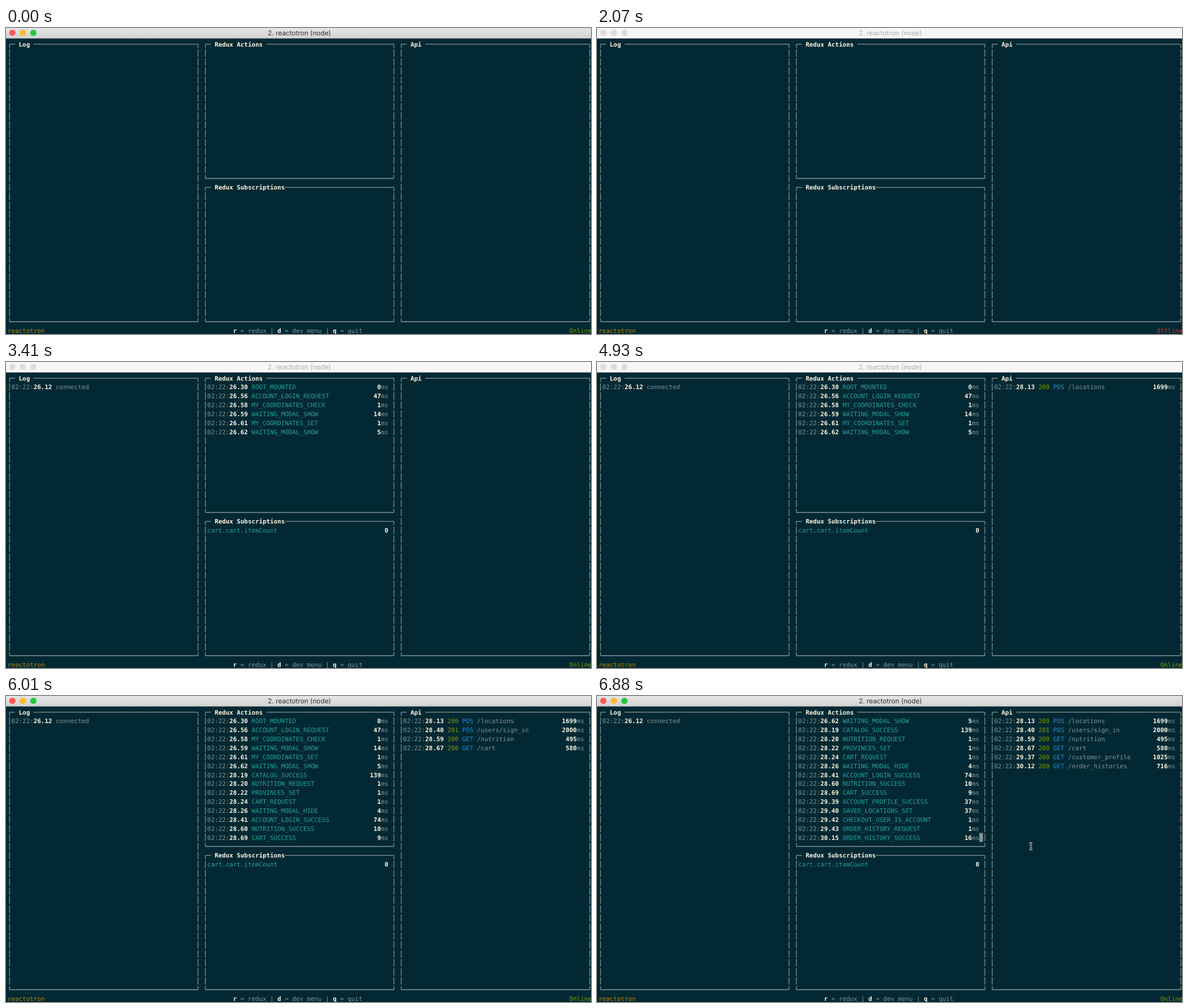
Animation, 1033 px wide and 542 px high, one loop 8 s. Source, as an HTML page with a canvas:

```html
<!DOCTYPE html>
<html lang="en">
<head>
<meta charset="utf-8">
<title>2. reactotron (node)</title>
<style>
html, body { margin: 0; width: 100%; height: 100%; overflow: hidden; background: #022933; }
canvas { display: block; }
</style>
</head>
<body>
<canvas id="stage" width="1033" height="542"></canvas>
<script>
const ctx = document.getElementById('stage').getContext('2d');
const LOOP = 8000, CELL = 6.525, ROW = 15.86, VISIBLE = 14;
const C = {
  bg: '#022933', gray: '#839496', white: '#fdf6e3', cyan: '#2aa198',
  blue: '#268bd2', green: '#859900', yellow: '#b58900', red: '#dc322f'
};

// appears at (ms), clock, name, duration
const actions = [
  [3320, '26.30', 'ROOT_MOUNTED', 0],
  [3320, '26.56', 'ACCOUNT_LOGIN_REQUEST', 47],
  [3410, '26.58', 'MY_COORDINATES_CHECK', 1],
  [3410, '26.59', 'WAITING_MODAL_SHOW', 14],
  [3410, '26.61', 'MY_COORDINATES_SET', 1],
  [3410, '26.62', 'WAITING_MODAL_SHOW', 5],
  [5020, '28.19', 'CATALOG_SUCCESS', 139],
  [5020, '28.20', 'NUTRITION_REQUEST', 1],
  [5020, '28.22', 'PROVINCES_SET', 1],
  [5020, '28.24', 'CART_REQUEST', 1],
  [5020, '28.26', 'WAITING_MODAL_HIDE', 4],
  [5200, '28.41', 'ACCOUNT_LOGIN_SUCCESS', 74],
  [5380, '28.60', 'NUTRITION_SUCCESS', 10],
  [5470, '28.69', 'CART_SUCCESS', 9],
  [6180, '29.39', 'ACCOUNT_PROFILE_SUCCESS', 37],
  [6270, '29.40', 'SAVED_LOCATIONS_SET', 37],
  [6270, '29.42', 'CHECKOUT_USER_IS_ACCOUNT', 1],
  [6270, '29.43', 'ORDER_HISTORY_REQUEST', 1],
  [6880, '30.15', 'ORDER_HISTORY_SUCCESS', 16]
];
// appears at (ms), clock, status, verb, path, duration
const calls = [
  [4930, '28.13', 200, 'POS', '/locations', 1699],
  [5200, '28.40', 201, 'POS', '/users/sign_in', 2000],
  [5380, '28.59', 200, 'GET', '/nutrition', 495],
  [5470, '28.67', 200, 'GET', '/cart', 580],
  [6180, '29.37', 200, 'GET', '/customer_profile', 1025],
  [6880, '30.12', 200, 'GET', '/order_histories', 716]
];
// time, x, y of the mouse pointer
const pointer = [[6450, 1023, 306], [6540, 905, 272], [6630, 795, 259], [6700, 766, 266]];

const colX = col => 3 + col * CELL;
const rowY = row => 28.6 + row * ROW;
const midX = col => colX(col + 0.5);

// Terminal text: one glyph per grid cell; returns the next free column.
function put(col, row, text, color = C.gray, bold = false) {
  ctx.font = `${bold ? 'bold ' : ''}10.84px "DejaVu Sans Mono", Menlo, monospace`;
  ctx.textAlign = 'left';
  ctx.fillStyle = color;
  for (const ch of String(text)) ctx.fillText(ch, colX(col++), rowY(row) + 4);
  return col;
}

const strong = (col, row, text) => put(col, row, text, C.white, true);
const stamp = (col, row, clock) => strong(put(col, row, '02:22:'), row, clock);

function duration(end, row, ms) {
  put(strong(end - 2 - String(ms).length, row, ms), row, 'ms');
}

function line(x1, y1, x2, y2) {
  ctx.beginPath();
  ctx.moveTo(x1, y1);
  ctx.lineTo(x2, y2);
  ctx.stroke();
}

function panel(left, right, top, bottom, title, gap = 1) {
  const x1 = midX(left), x2 = midX(right), y1 = rowY(top), y2 = rowY(bottom), half = 6.6;
  ctx.strokeStyle = C.gray;
  ctx.lineWidth = 1.3;
  line(x1, y1, colX(left + 2), y1);
  line(colX(left + 3 + title.length + gap), y1, x2, y1);
  line(x1, y2, x2, y2);
  for (const x of [x1, x2]) {
    line(x, y1, x, y1 + half);
    line(x, y2 - half, x, y2);
    for (let r = top + 1; r < bottom; r++) line(x, rowY(r) - half, x, rowY(r) + half);
  }
  strong(left + 3, top, title);
}

function titleBar(active) {
  const fill = ctx.createLinearGradient(0, 0, 0, 19);
  fill.addColorStop(0, active ? '#e5e5e5' : '#f6f6f6');
  fill.addColorStop(1, active ? '#d2d2d2' : '#f6f6f6');
  ctx.fillStyle = fill;
  ctx.fillRect(0, 0, 1033, 18.5);
  ['#fc5b57', '#fdbc2e', '#28c840'].forEach((color, i) => {
    ctx.beginPath();
    ctx.arc(11.2 + i * 18.6, 8.5, 5.6, 0, 7);
    ctx.fillStyle = active ? color : '#dcdcdc';
    ctx.fill();
  });
  ctx.font = '11.8px Inter, sans-serif';
  ctx.textAlign = 'center';
  ctx.fillStyle = active ? '#333' : '#acacac';
  ctx.fillText('2. reactotron (node)', 518, 13);
}

function footer(online) {
  put(0, 32, 'reactotron', C.yellow);
  let col = 61;
  for (const [key, label] of [['r', ' = redux | '], ['d', ' = dev menu | '], ['q', ' = quit']])
    col = put(strong(col, 32, key), 32, label);
  if (online) put(152, 32, 'Online', C.green);
  else put(151, 32, 'Offline', C.red);
}

function iBeam(x, y) {
  for (const [color, width] of [['#d8dcdc', 2.6], ['#1a1a1a', 0.9]]) {
    ctx.strokeStyle = color;
    ctx.lineWidth = width;
    ctx.beginPath();
    for (const s of [-1, 1]) {
      ctx.moveTo(x - 2.6, y + s * 6);
      ctx.quadraticCurveTo(x, y + s * 6, x, y + s * 3.5);
      ctx.quadraticCurveTo(x, y + s * 6, x + 2.6, y + s * 6);
    }
    ctx.moveTo(x, y - 4);
    ctx.lineTo(x, y + 4);
    ctx.moveTo(x - 1.6, y + 0.5);
    ctx.lineTo(x + 1.6, y + 0.5);
    ctx.stroke();
  }
}

function draw(t) {
  const shown = list => list.filter(item => t >= item[0]);
  ctx.textRendering = 'geometricPrecision';
  ctx.fillStyle = C.bg;
  ctx.fillRect(0, 0, 1033, 542);
  titleBar(t < 990 || t >= 6010);

  panel(0, 51, 0, 31, 'Log');
  panel(53, 104, 0, 15, 'Redux Actions');
  panel(53, 104, 16, 31, 'Redux Subscriptions', 0);
  panel(106, 157, 0, 31, 'Api');
  footer(t < 2070 || t >= 2600);

  if (t >= 2870) put(stamp(1, 1, '26.12'), 1, ' connected');
  if (t >= 3320) {
    put(54, 17, 'cart.cart.itemCount', C.cyan);
    strong(102, 17, '0');
  }
  shown(actions).slice(-VISIBLE).forEach(([, clock, name, ms], i) => {
    stamp(54, i + 1, clock);
    put(66, i + 1, name, C.cyan);
    duration(103, i + 1, ms);
  });
  shown(calls).forEach(([, clock, status, verb, path, ms], i) => {
    stamp(107, i + 1, clock);
    put(119, i + 1, status, C.green);
    put(123, i + 1, verb, C.blue);
    put(127, i + 1, path);
    duration(156, i + 1, ms);
  });
  if (t >= 6180) {
    ctx.fillStyle = C.gray;
    ctx.fillRect(colX(103), rowY(VISIBLE) - 8, CELL, ROW);
  }
  const spot = shown(pointer).pop();
  if (spot) iBeam(spot[1], spot[2]);
}

const start = performance.now();
function tick() {
  draw((performance.now() - start) % LOOP);
  requestAnimationFrame(tick);
}
tick();
</script>
</body>
</html>
```
